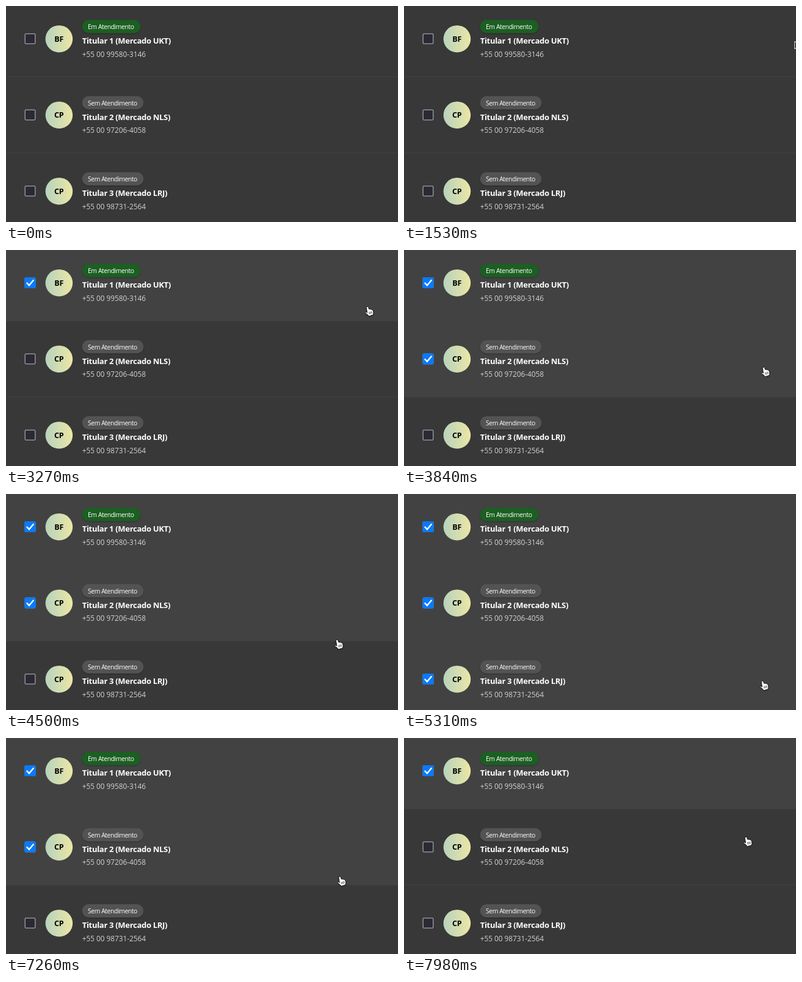
An HTML page that plays this animation: 642x356 px, repeating every 8 s.

```html
<!DOCTYPE html>
<html lang="pt">
<head>
<meta charset="utf-8">
<title>Lista de contatos</title>
<style>
  html, body { margin: 0; width: 100%; height: 100%; overflow: hidden; background: #383838; }
  svg { display: block; width: 642px; height: 356px; font-family: "Open Sans", sans-serif; }
  .tag { font-size: 10.4px; letter-spacing: -.42px; fill: #fff; }
  .name { font-size: 13px; font-weight: 700; letter-spacing: -.3px; fill: #fff; }
  .phone { font-size: 11.8px; fill: #d2d2d2; }
  .initials { font-size: 12.5px; font-weight: 700; letter-spacing: -.2px; fill: #000; text-anchor: middle; }
</style>
</head>
<body>
<svg viewBox="0 0 642 356">
  <defs>
    <linearGradient id="avatar">
      <stop offset="0" stop-color="#b7d3bd"/>
      <stop offset="1" stop-color="#ece6a5"/>
    </linearGradient>
    <filter id="shadow" x="-20%" y="-40%" width="140%" height="200%">
      <feDropShadow dx="0" dy="1" stdDeviation="1" flood-opacity=".3"/>
    </filter>
  </defs>
  <g id="rows"></g>
  <g id="cursor" stroke-linejoin="round" stroke-linecap="round" filter="url(#shadow)">
    <path id="arrow" d="M.5 .5V13L3.4 10.3L5.3 14.7L7.5 13.8L5.6 9.5H9.4Z" fill="#111" stroke="#fff"/>
    <g id="hand" stroke="#111" stroke-width=".9">
      <path fill="#fff" d="M4.2 1.2c1-.6 2 0 2.3.9l1.2 3.2c.8-.6 1.7-.3 2.1.3.8-.5 1.7-.2 2.1.5.9-.3 1.7.1 2 1l.9 3.2c.3 1.8-.4 2.8-.8 4.4l-6.8 2c-1-2-2.6-3.2-4.3-4.3-.9-.6-1.9-1.5-1.4-2.1.7-.8 2.1-.1 3.1.7L3.3 2.9c-.2-.8.2-1.4.9-1.7z"/>
      <path fill="none" stroke-width=".8" d="M7.5 10.2l.9 3M9.5 9.6l.9 3M11.5 9l.9 3"/>
    </g>
  </g>
</svg>
<script>
const LOOP = 8000, ROW_HEIGHT = 125.5;
const ENTER = 1530, HOVER = 1560;

const contacts = [
  { initials: "BF", tag: "Em Atendimento", tagWidth: 95.5, tagColor: "#1b5e20",
    name: "Titular 1 (Mercado UKT)", phone: "+55 00 99580-3146", on: 2580, off: LOOP },
  { initials: "CP", tag: "Sem Atendimento", tagWidth: 100.5, tagColor: "#525252",
    name: "Titular 2 (Mercado NLS)", phone: "+55 00 97206-4058", on: 3840, off: 7560 },
  { initials: "CP", tag: "Sem Atendimento", tagWidth: 100.5, tagColor: "#525252",
    name: "Titular 3 (Mercado LRJ)", phone: "+55 00 98731-2564", on: 5190, off: 6720 },
];

// Each move follows a quadratic curve: start, control point, end.
const moves = [
  { from: 1530, to: 1680, path: [[639.5, 58], [606, 5], [576, 50]] },
  { from: 1680, to: 1830, path: [[576, 50], [584, 105], [603, 61]] },
  { from: 3090, to: 3630, path: [[603, 61], [565, 119], [584, 192]] },
  { from: 4290, to: 4830, path: [[584, 192], [480, 268], [582, 307]] },
  { from: 6930, to: 7500, path: [[582, 307], [507, 245], [569, 176]] },
  { from: 7860, to: 7980, path: [[569, 176], [562, 169], [555, 162]] },
];

const $ = id => document.getElementById(id);
const show = (node, visible) => node.setAttribute("visibility", visible ? "inherit" : "hidden");

$("rows").innerHTML = contacts.map((c, i) => `
  <g transform="translate(0 ${i * ROW_HEIGHT})">
    <rect class="selected" y="-9" width="642" height="${ROW_HEIGHT}" fill="#424242"/>
    <rect y="116" width="642" height="1" fill="#434343"/>
    <rect x="31.25" y="45.75" width="16.5" height="16.5" rx="1.5" fill="#2b2a33" stroke="#8f8f9d" stroke-width="1.5"/>
    <g class="check">
      <rect x="30.5" y="45" width="18" height="18" rx="2" fill="#087aff"/>
      <path d="M34.5 54.6l3.4 3.6 6.8-8.2" fill="none" stroke="#fff" stroke-width="2.4" stroke-linecap="round"/>
    </g>
    <circle cx="86.9" cy="54.2" r="22.3" fill="url(#avatar)"/>
    <text class="initials" x="86.8" y="58.8">${c.initials}</text>
    <rect x="124.7" y="23.1" width="${c.tagWidth}" height="21.6" rx="10.8" fill="${c.tagColor}" filter="url(#shadow)"/>
    <text class="tag" x="134" y="38">${c.tag}</text>
    <text class="name" x="124.7" y="62.4">${c.name}</text>
    <text class="phone" x="124.7" y="83.6">${c.phone}</text>
  </g>`).join("");

const rows = [...$("rows").children].map(row => row.querySelectorAll(".selected, .check"));

function cursorAt(time) {
  const move = moves.findLast(m => time >= m.from) || moves[0];
  const p = Math.max(0, Math.min(1, (time - move.from) / (move.to - move.from)));
  const s = p * p * (3 - 2 * p);
  const [a, b, c] = move.path;
  return [0, 1].map(k => (1 - s) ** 2 * a[k] + 2 * s * (1 - s) * b[k] + s * s * c[k]);
}

function draw(time) {
  contacts.forEach((c, i) => {
    const selected = time >= c.on && time < c.off;
    rows[i].forEach(node => show(node, selected));
  });
  show($("cursor"), time >= ENTER);
  show($("arrow"), time < HOVER);
  show($("hand"), time >= HOVER);
  $("cursor").setAttribute("transform", `translate(${cursorAt(time)})`);
}

const start = performance.now();
function frame() {
  draw((performance.now() - start) % LOOP);
  requestAnimationFrame(frame);
}
frame();
</script>
</body>
</html>
```
